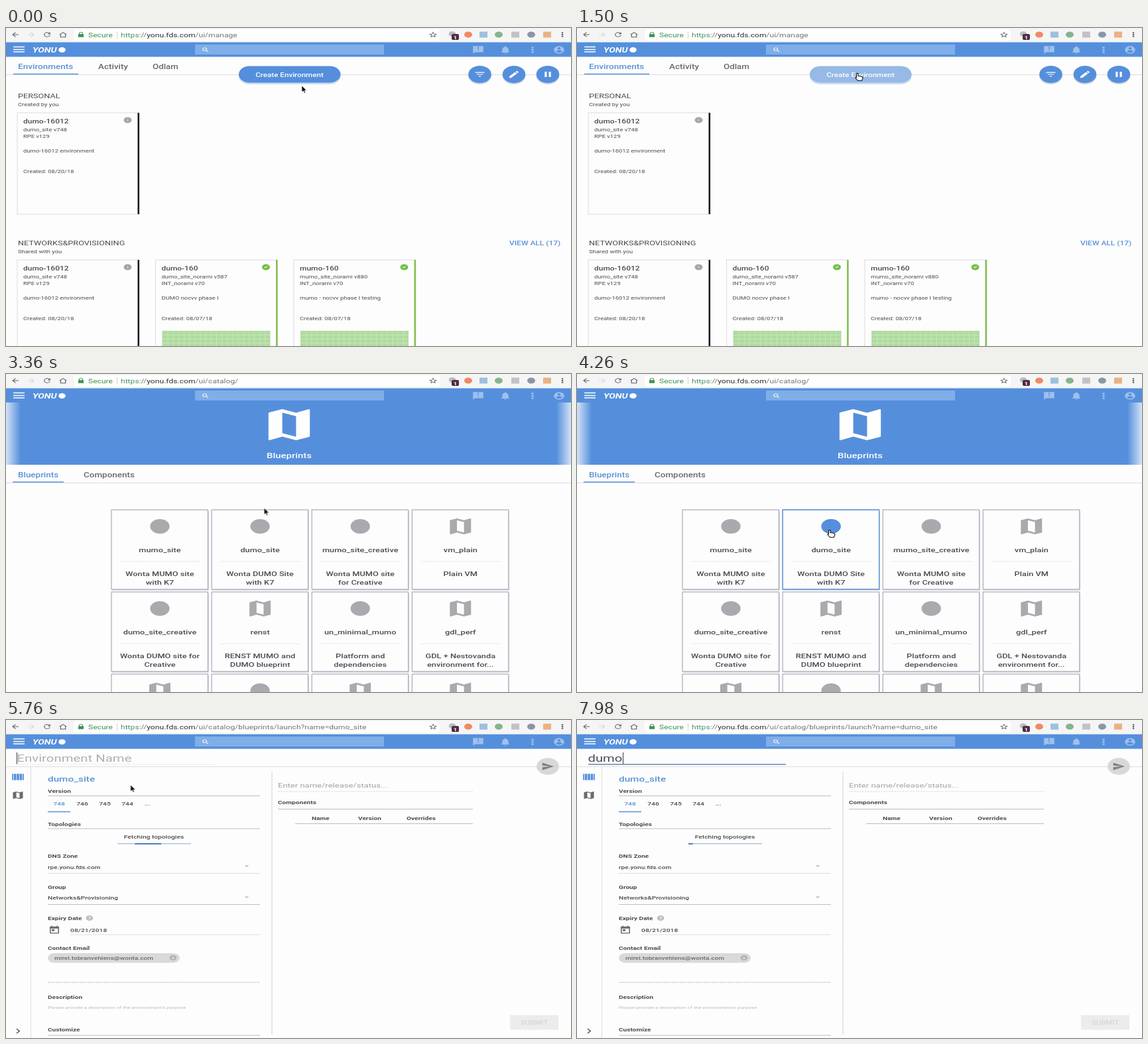
Write an HTML page that moves like this. It is 852x480 px and loops after 8 s.

```html
<!DOCTYPE html>
<html lang="en">
<head>
<meta charset="utf-8">
<title>Environment manager</title>
<style>
  html, body { margin: 0; width: 100%; height: 100%; overflow: hidden; background: #fdfdfd; }
  svg#stage { display: block; width: 100%; height: 100%; }
  text { font-family: Roboto, Arial, sans-serif; white-space: pre; }
  .step { animation: 8s step-end infinite; }
  .manage { animation-name: manage; }
  .catalog { animation-name: catalog; }
  .form { animation-name: form; }
  .loading { animation-name: loading; }
  .loaded { animation-name: loaded; }
  .press { animation-name: press; }
  .hover { animation-name: hover; }
  .arrow { animation-name: arrow; }
  .hand { animation-name: hand; }
  .beam { animation-name: beam; }
  .focus { animation-name: focus; }
  .hint { animation-name: hint; }
  .typing { animation-name: typing; }
  .caret { animation-name: caret; }
  .pointer { animation: pointer 8s ease-in-out infinite; }
  .bar { animation: bar 1333.333ms linear -136ms infinite; }

  @keyframes manage { 0% { opacity: 1 } 23.75%, 100% { opacity: 0 } }
  @keyframes catalog { 0% { opacity: 0 } 23.75% { opacity: 1 } 55.6%, 100% { opacity: 0 } }
  @keyframes form { 0% { opacity: 0 } 55.6%, 100% { opacity: 1 } }
  @keyframes loading { 0% { opacity: 1 } 71.5%, 100% { opacity: 0 } }
  @keyframes loaded { 0% { opacity: 0 } 71.5%, 100% { opacity: 1 } }
  @keyframes press { 0% { fill: #558fdc } 7.5%, 100% { fill: #96b9e6 } }
  @keyframes hover { 0% { opacity: 0 } 43.1%, 100% { opacity: 1 } }
  @keyframes arrow {
    0% { opacity: 1 } 7.5% { opacity: 0 } 23.75% { opacity: 1 }
    43.1% { opacity: 0 } 64.5% { opacity: 1 } 74.5%, 100% { opacity: 0 }
  }
  @keyframes hand {
    0% { opacity: 0 } 7.5% { opacity: 1 } 23.75% { opacity: 0 }
    43.1% { opacity: 1 } 64.5%, 100% { opacity: 0 }
  }
  @keyframes beam { 0% { opacity: 0 } 74.5% { opacity: 1 } 86%, 100% { opacity: 0 } }
  @keyframes focus { 0% { opacity: 0 } 78%, 100% { opacity: 1 } }
  @keyframes hint { 0% { opacity: 1 } 87.5%, 100% { opacity: 0 } }
  @keyframes typing {
    0% { transform: translate(16px, 0) } 87.5% { transform: translate(28px, 0) }
    90.5% { transform: translate(39.2px, 0) } 93% { transform: translate(57px, 0) }
    96%, 100% { transform: translate(68.5px, 0) }
  }
  @keyframes caret {
    0% { opacity: 1 } 62% { opacity: 0 } 68.5% { opacity: 1 } 75% { opacity: 0 }
    78% { opacity: 1 } 84.5% { opacity: 0 } 87%, 100% { opacity: 1 }
  }
  @keyframes pointer {
    0%, 6% { transform: translate(446px, 87px) }
    16%, 33% { transform: translate(423px, 68px) }
    46%, 64% { transform: translate(381px, 235px) }
    76%, 100% { transform: translate(130px, 57px) }
  }
  @keyframes bar { 0%, 5% { transform: translate(-40px, 0) } 90%, 100% { transform: translate(111px, 0) } }
</style>
</head>
<body>
<svg id="stage" viewBox="0 0 852 480" preserveAspectRatio="none"></svg>
<script>
const WIDE = 1.331; // the screen is shown wider than it was laid out
const C = {
  page: '#fdfdfd', blue: '#558fdc', link: '#5a92d6', ink: '#4b4b4e', soft: '#69696c', pale: '#b5b5b8',
  rule: '#dcdce0', strong: '#bdbdc4', edge: '#9a9aae', icon: '#a9a9ae', white: '#fefefe', tint: '#a0c0ec'
};
const P = {
  map: 'M20.5 3l-.16.03L15 5.1 9 3 3.36 4.9c-.21.07-.36.25-.36.48V20.5c0 .28.22.5.5.5l.16-.03L9 18.9l6 2.1 5.64-1.9c.21-.07.36-.25.36-.48V3.5c0-.28-.22-.5-.5-.5zM15 19l-6-2.11V5l6 2.11z',
  search: 'M15.5 14h-.79l-.28-.27A6.47 6.47 0 0 0 16 9.5 6.5 6.5 0 1 0 9.5 16c1.61 0 3.09-.59 4.23-1.57l.27.28v.79l5 4.99L20.49 19zm-6 0a4.5 4.5 0 1 1 0-9 4.5 4.5 0 0 1 0 9z',
  bell: 'M12 22a2 2 0 0 0 2-2h-4a2 2 0 0 0 2 2zm6-6v-5c0-3.07-1.64-5.64-4.5-6.32V4a1.5 1.5 0 0 0-3 0v.68C7.63 5.36 6 7.92 6 11v5l-2 2v1h16v-1z',
  person: 'M12 2a10 10 0 1 0 0 20 10 10 0 0 0 0-20zm0 3a3 3 0 1 1 0 6 3 3 0 0 1 0-6zm0 14.2a7.2 7.2 0 0 1-6-3.22c.03-1.99 4-3.08 6-3.08s5.97 1.09 6 3.08a7.2 7.2 0 0 1-6 3.22z',
  chat: 'M2 2h20v16H6l-4 4zM11 4v6h2V4zM11 12v2h2v-2z',
  dots: 'M10 4h4v4h-4zM10 10h4v4h-4zM10 16h4v4h-4z',
  edit: 'M3 17.25V21h3.75L17.81 9.94l-3.75-3.75zM20.71 7.04a1 1 0 0 0 0-1.41l-2.34-2.34a1 1 0 0 0-1.41 0l-1.83 1.83 3.75 3.75z',
  filter: 'M10 18h4v-2h-4zM3 6v2h18V6zM6 13h12v-2H6z',
  pause: 'M6 19h4V5H6zM14 5v14h4V5z',
  send: 'M2 21l21-9L2 3v7l15 2-15 2z',
  back: 'M20 11H7.8l5.6-5.6L12 4l-8 8 8 8 1.4-1.4L7.8 13H20z',
  forward: 'M4 11h12.2l-5.6-5.6L12 4l8 8-8 8-1.4-1.4 5.6-5.6H4z',
  reload: 'M17.65 6.35A8 8 0 1 0 19.73 14h-2.08A6 6 0 1 1 12 6c1.66 0 3.14.69 4.22 1.78L13 11h7V4z',
  home: 'M12 3L2 12h3v9h14v-9h3zM12 6l5 4.5V19H7v-8.5z',
  lock: 'M6 10V7a6 6 0 0 1 12 0v3h2v12H4V10zM8 10h8V7a4 4 0 0 0-8 0z',
  star: 'M12 2l3 7 7 .6-5.4 4.7 1.6 7.2L12 17.7 5.8 21.5l1.6-7.2L2 9.6 9 9zM12 6l-1.7 4.3-4 .4 3 2.7-.8 4L12 15.5l3.5 1.9-.8-4 3-2.7-4-.4z',
  calendar: 'M19 3h-1V1h-2v2H8V1H6v2H3v18h18V3zM19 19H5V8h14zM7 10h5v5H7z',
  columns: 'M2 5h2v14H2zM5 5h4v14H5zM10 5h4v14h-4zM15 5h4v14h-4zM20 5h2v14h-2z',
  check: 'M5 12l2-2 3 3 7-7 2 2-9 9z',
  info: 'M11 6h2v2h-2zM11 10h2v8h-2z',
  next: 'M8 5l2-2 9 9-9 9-2-2 7-7z',
  drop: 'M5 9h14l-7 6z'
};

const rect = (x, y, w, h, fill, more = '') =>
  `<rect x="${x}" y="${y}" width="${w}" height="${h}" fill="${fill}" ${more}/>`;
const oval = (x, y, ry, fill, more = '') =>
  `<ellipse cx="${x}" cy="${y}" rx="${ry * WIDE}" ry="${ry}" fill="${fill}" ${more}/>`;
const line = (x1, x2, y, color = C.rule, w = 1, dash = '') =>
  `<path d="M${x1} ${y}H${x2}" stroke="${color}" stroke-width="${w}" stroke-dasharray="${dash}"/>`;
const text = (x, y, size, str, fill = C.ink, weight = 400, more = '') =>
  `<text transform="matrix(${WIDE} 0 0 1 ${x} ${y})" font-size="${size}" font-weight="${weight}" fill="${fill}" ${more}>${str}</text>`;
const mid = (x, y, size, str, fill, weight = 500) => text(x, y, size, str, fill, weight, 'text-anchor="middle"');
const icon = (x, y, size, name, fill) => {
  const k = size / 24;
  return `<path transform="matrix(${k * WIDE} 0 0 ${k} ${x} ${y}) translate(-12 -12)" fill-rule="evenodd" fill="${fill}" d="${P[name]}"/>`;
};
const group = (name, body) => `<g class="step ${name}">${body}</g>`;

function browser(path) {
  const nav = [[14, 'back', '#636366'], [38, 'forward', '#d8d8dc'], [62, 'reload', '#636366'], [86, 'home', '#636366']];
  const extras = [[697, '#f08a62'], [743, '#85b58c'], [792, '#8a96a4']];
  const squares = [[720, '#9cc0e0'], [768, '#c2c2c6'], [816, '#eab184']];
  return rect(0, 0, 852, 21, '#f5f5f6') + rect(102, 2, 552, 17, C.white, 'rx="4"') +
    nav.map(([x, n, c]) => icon(x, 10, 11, n, c)).join('') +
    icon(113, 10, 9, 'lock', '#3f9150') + text(124, 13.5, 9.1, 'Secure', '#3f9150') +
    rect(167, 5, 1, 11, '#d4d4d8') +
    text(173, 13.5, 9.1, `<tspan fill="#4c9060">https</tspan>://<tspan fill="#2e2e30">yonu.fds.com</tspan>${path}`, '#747477') +
    icon(644, 10, 11, 'star', '#636366') +
    oval(673, 9, 4, '#bcbcc4') + rect(672, 9, 11, 9, '#502c44', 'rx="2"') + mid(677.5, 16.5, 7, '1', C.white, 700) +
    extras.map(([x, c]) => oval(x, 10, 4.5, c)).join('') +
    squares.map(([x, c]) => rect(x - 6, 5.5, 12, 9, c)).join('') +
    icon(839, 10, 11, 'dots', '#636366');
}

function header(height) {
  return rect(0, 21.5, 852, height, C.blue) +
    [28.5, 32.5, 36].map(y => line(11, 28, y, C.white, 1.5)).join('') +
    text(40, 37, 10.7, 'YONU', C.white, 700, 'font-style="italic"') + oval(84.5, 33, 4, C.white) +
    rect(285, 25, 285, 15, '#80aee8') + icon(301, 33, 9.5, 'search', C.white) +
    [[712, 'chat'], [753, 'bell'], [794, 'dots'], [834, 'person']].map(([x, n]) => icon(x, 33, 14, n, C.tint)).join('');
}

const screen = (path, height) => rect(0, 0, 852, 480, C.page) + browser(path) + header(height);

function envCard(x, y, title, lines, note, date, ok) {
  const edge = ok ? '#86c04e' : '#1a1a1c';
  let grid = '';
  if (ok) {
    grid = rect(x + 10, y + 107, 163, 30, '#b0dba0');
    for (let i = 1; i < 20; i++) grid += rect(x + 10 + i * 8.15, y + 107, 1, 30, '#c6e6b8');
    for (let i = 1; i < 4; i++) grid += rect(x + 10, y + 107 + i * 6, 163, 1, '#c6e6b8');
  }
  return rect(x, y, 184, 153, C.page, `stroke="${C.rule}"`) + rect(x + 181.5, y, 2.5, 153, edge) +
    text(x + 9, y + 15.5, 9, title, C.ink, 500) +
    lines.map((s, i) => text(x + 9, y + 27.5 + i * 10.5, 7.05, s)).join('') +
    text(x + 9, y + 60, 7.05, note) + text(x + 9, y + 91, 7.05, 'Created: ' + date) +
    oval(x + 166.5, y + 11, 4.5, ok ? '#72c044' : '#a8a4a8') +
    icon(x + 166.5, y + 11, 7, ok ? 'check' : 'info', C.white) + grid;
}

function manage() {
  const mine = ['dumo-16012', ['dumo_site v748', 'RPE v129'], 'dumo-16012 environment', '08/20/18', false];
  const pill = (y, more) => rect(351, y, 153.5, 25, C.blue, `rx="16" ry="12.5" ${more}`);
  return screen('/ui/manage', 22) +
    line(0, 852, 70.5) + line(11, 109, 69.5, C.link, 1.5) +
    text(18, 61.5, 10.2, 'Environments', C.link, 500) +
    text(139, 61.5, 10.1, 'Activity', C.soft, 500) + text(221, 61.5, 10, 'Odlam', C.soft, 500) +
    pill(60, 'opacity=".3"') + pill(57.5, 'class="step press"') +
    mid(427.5, 73.5, 8.75, 'Create Environment', C.white) +
    [[714.5, 'filter'], [766, 'edit'], [817, 'pause']].map(([x, n]) =>
      oval(x, 72, 13, '#ccd4e0') + oval(x, 70, 13, C.blue) + icon(x, 70, 14, n, C.white)).join('') +
    text(18, 106, 9.55, 'PERSONAL') + text(18, 118, 7.05, 'Created by you') + envCard(17, 128, ...mine) +
    text(18, 328, 9.55, 'NETWORKS&amp;PROVISIONING') + text(18, 340, 7.05, 'Shared with you') +
    text(759, 328, 9, 'VIEW ALL (17)', C.link, 500) +
    envCard(17, 350, ...mine) +
    envCard(225.5, 350, 'dumo-160', ['dumo_site_norami v587', 'INT_norami v70'], 'DUMO nocvv phase I', '08/07/18', true) +
    envCard(434, 350, 'mumo-160', ['mumo_site_norami v880', 'INT_norami v70'], 'mumo - nocvv phase I testing', '08/07/18', true);
}

const mark = (x, y, fill) => oval(x, y, 11, fill);

function blueprint(x, y, kind, name = '', lines = []) {
  const cx = x + 73;
  return rect(x + 1, y + 2, 146, 120, '#e0e0e8') + rect(x, y, 145.5, 120, C.page, `stroke="${C.edge}"`) +
    (kind === 'map' ? icon(cx, y + 25, 32, 'map', C.icon) : mark(cx, y + 25, C.icon)) +
    mid(cx, y + 63.5, 9.6, name, C.ink) + line(x + 14, x + 133, y + 78, C.rule, 1, '2 1') +
    lines.map((s, i) => mid(cx, y + 99.5 + i * 13, 9.6, s, C.ink)).join('');
}

function catalog() {
  const items = [
    ['mark', 'mumo_site', ['Wonta MUMO site', 'with K7']],
    ['mark', 'dumo_site', ['Wonta DUMO Site', 'with K7']],
    ['mark', 'mumo_site_creative', ['Wonta MUMO site', 'for Creative']],
    ['map', 'vm_plain', ['Plain VM']],
    ['mark', 'dumo_site_creative', ['Wonta DUMO site for', 'Creative']],
    ['map', 'renst', ['RENST MUMO and', 'DUMO blueprint']],
    ['mark', 'un_minimal_mumo', ['Platform and', 'dependencies']],
    ['map', 'gdl_perf', ['GDL + Nestovanda', 'environment for...']],
    ['map'], ['mark'], ['map'], ['map']
  ];
  return screen('/ui/catalog/', 115.5) +
    rect(0, 43, 22, 94, 'url(#fade)') + rect(-852, 43, 22, 94, 'url(#fade)', 'transform="scale(-1 1)"') +
    icon(427, 76.5, 62.5, 'map', C.white) + mid(427, 127, 11.2, 'Blueprints', C.white) +
    text(18, 155.5, 10.1, 'Blueprints', C.link, 500) + text(117, 155.5, 10.1, 'Components', C.soft, 500) +
    line(0, 852, 164.5) + line(10, 87, 163, C.link, 1.5) +
    items.map((it, i) => blueprint(159 + (i % 4) * 151.1, 205 + Math.floor(i / 4) * 124, ...it)).join('') +
    group('hover', rect(310.1, 205, 145.5, 120, 'none', `stroke="${C.blue}" stroke-width="1.3"`) + mark(383.1, 230, C.blue));
}

const label = (y, s) => text(63, y, 7.6, s, C.ink, 700);
const rule = (y, x = 63, dash = '') => line(x, 383, y, C.strong, 1, dash);
const fetching = (y, what) => mid(223, y, 7.7, 'Fetching ' + what, C.ink) +
  rect(168, y + 7.5, 111, 1.3, '#a8bcd8') +
  `<svg x="168" y="${y + 7.3}" width="111" height="1.7">${rect(0, 0, 40, 2, '#4a7ab8', 'class="bar"')}</svg>`;
const expiry = y => label(y, 'Expiry Date') + oval(126, y - 3, 4, '#bdbdc0') + mid(126, y - 0.5, 6.5, '?', C.page) +
  icon(73, y + 15, 14, 'calendar', C.soft) + text(97, y + 18, 7.8, '08/21/2018', C.ink, 500) + rule(y + 22, 97, '1 1');
const tail = (y, submitY) => label(y, 'Description') +
  text(63, y + 15.5, 6.1, "Please provide a description of the environment's purpose", '#b9b9bc') +
  label(y + 49.5, 'Customize') +
  rect(760, submitY, 73, 22, '#ececee') + mid(796.5, submitY + 14, 8.5, 'SUBMIT', '#d6d6da');
const drops = (a, b) => icon(363, a, 9, 'drop', C.pale) + icon(363, b, 9, 'drop', C.pale);

function loading() {
  return fetching(129, 'versions') + label(158.5, 'Topologies') + rule(162.5) + fetching(177.5, 'topologies') +
    label(206.5, 'DNS Zone') + rule(230) + label(253.5, 'Group') + drops(219, 266) +
    line(63, 383, 277, '#e26a50', 2) +
    text(63, 288.5, 7.7, 'You are not a member of any group', '#cf4f38', 500) +
    expiry(317) + label(362, 'Contact Email') + rule(391, 63, '1 1') + tail(415.5, 443) + rule(470.5, 63, '2 1');
}

function loaded() {
  const versions = ['748', '746', '745', '744', '...'];
  return versions.map((v, i) => mid([80, 115, 149, 183, 213][i], 129, 7.8, v, i ? C.ink : C.link)).join('') +
    line(63, 97, 138.5, C.link, 1.5) +
    label(159.5, 'Topologies') + rule(164) + fetching(178.5, 'topologies') +
    label(207.5, 'DNS Zone') + text(63, 224.5, 7.6, 'rpe.yonu.fds.com', C.ink, 500) + rule(231.5, 63, '1 1') +
    label(254.5, 'Group') + text(63, 271, 7.6, 'Networks&amp;Provisioning', C.ink, 500) + drops(220.5, 267.5) + rule(278.5) +
    expiry(302) + label(347, 'Contact Email') +
    rect(63, 352, 199, 14.5, '#d9d9db', 'rx="10" ry="7.25"') +
    text(73, 361.5, 7.6, 'mirel.tobranvehlens@wonta.com', C.soft, 500) +
    oval(252, 359, 4, '#b3b3b6') + mid(252, 361.5, 7, '×', '#ececee') +
    rule(396, 63, '3 1') + tail(420.5, 445.5) + rule(476);
}

function form() {
  return screen('/ui/catalog/blueprints/launch?name=dumo_site', 22) +
    line(0, 852, 70.5) + line(17, 315, 67, C.rule, 1, '1 1') +
    group('focus', line(17, 315, 67, '#6588b4', 1.5)) +
    text(16.5, 63, 15.2, 'dumo', C.ink) +
    group('typing', rect(0, 48, 62, 18, C.page) + rect(0, 49, 1, 17.5, '#38383a', 'class="step caret"')) +
    group('hint', text(16.5, 63, 15.3, 'Environment Name', '#b0b0b3')) +
    rect(37, 71, 1, 409, C.rule) + icon(18, 86, 16, 'columns', C.blue) + icon(18, 113.5, 15, 'map', C.soft) +
    icon(17.5, 469.5, 10, 'next', C.ink) +
    `<path d="M401 78V475" stroke="${C.strong}" stroke-dasharray="2 1"/>` +
    text(63, 92.5, 11.5, 'dumo_site', C.link, 500) + label(110, 'Version') + rule(114.5) +
    group('loading', loading()) + group('loaded', loaded()) +
    text(410, 102, 9.8, 'Enter name/release/status...', '#a3a3a6') + line(410, 704, 108, C.rule, 1, '3 1') +
    text(410, 126.5, 7.6, 'Components', C.ink, 700) + line(410, 704, 134.5, C.strong) +
    [[461, 'Name'], [531, 'Version'], [604, 'Overrides']].map(([x, s]) => text(x, 151, 7.6, s, C.ink, 700)).join('') +
    line(436, 704, 156.5, C.strong) +
    oval(817, 70, 12.7, '#d8d8da') + icon(817, 70, 15, 'send', '#808083');
}

const pointer = `<g class="pointer">
  <path class="step arrow" d="M0 0V9.8L2.4 7.8 4 11.2 5.6 10.5 4.1 7.2H7.3Z" fill="#101010" stroke="#fefefe" stroke-width=".6"/>
  <path class="step hand" d="M-1.5 1Q-.5-.3 1 1V4.5L5 5Q8 5.5 8 7.5L6.5 11.5H.5L-3 7.5Q-3 5.5-1.5 6.5Z" fill="#fefefe" stroke="#161616" stroke-width="1.1"/>
  <path class="step beam" d="M-3-5Q0-5 0-3.5Q0-5 3-5M0-3.5V3.5M-3 5Q0 5 0 3.5Q0 5 3 5" fill="none" stroke="#222"/>
</g>`;

document.getElementById('stage').innerHTML =
  `<linearGradient id="fade"><stop stop-color="#d4e2f6"/><stop offset="1" stop-color="${C.blue}"/></linearGradient>` +
  group('manage', manage()) + group('catalog', catalog()) + group('form', form()) + pointer;
</script>
</body>
</html>
```
